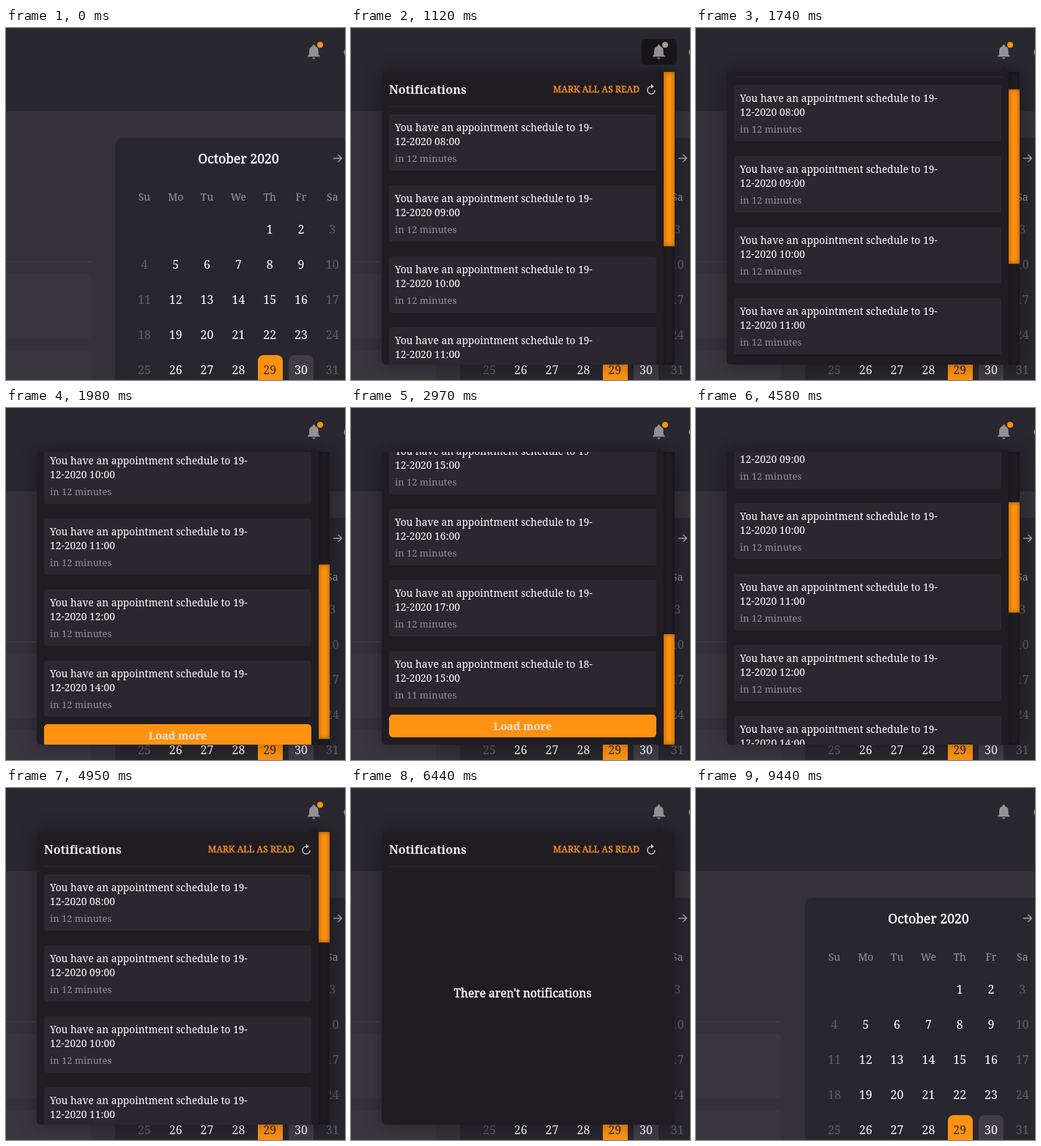
Write an HTML page with a canvas that moves like this. It is 463x481 px and loops after 9.56 s.

```html
<!DOCTYPE html>
<html lang="en">
<head>
<meta charset="utf-8">
<title>Notifications</title>
<style>
  html, body { margin: 0; width: 100%; height: 100%; overflow: hidden; background: #34313a; }
  canvas { display: block; }
</style>
</head>
<body>
<canvas id="stage" width="463" height="481"></canvas>
<script>
const ctx = document.getElementById('stage').getContext('2d');
const LOOP = 9560;
const ORANGE = '#ff9210', PANEL = '#1f1c22', CARD = '#2a272e';
const LIGHT = '#fff', MUTED = '#98969c', DIM = '#625f67';
const VIEW = { x: 42, y: 60, w: 400, h: 400 };
const PITCH = 97;
const BELL = new Path2D('M12 22a2 2 0 0 0 2-2h-4a2 2 0 0 0 2 2zM18 16v-5c0-3-1.6-5.6-4.5-6.3V4' +
  'a1.5 1.5 0 0 0-3 0v.7C7.6 5.4 6 8 6 11v5l-2 2v1h16v-1z');

const SLOTS = ['08', '09', '10', '11', '12', '14', '15', '16', '17']
  .map(hour => ({ day: 19, hour, wait: 12 }))
  .concat({ day: 18, hour: '15', wait: 11 });

// [start time, scroll offset]; each value holds until the next.
const SCROLL = [
  [0, 0], [1740, 40], [1860, 160], [1980, 258], [2100, 271], [2970, 659],
  [4220, 657], [4340, 560], [4460, 340], [4580, 182], [4830, 60], [4950, 0],
];
const scrollAt = t => SCROLL.findLast(([start]) => start <= t)[1];
const during = (t, from, to) => t >= from && t < to;

function box(x, y, w, h, radius, color) {
  ctx.fillStyle = color;
  ctx.beginPath();
  ctx.roundRect(x, y, w, h, radius);
  ctx.fill();
}

// A rectangle shaded along the inside of its edges.
function insetBox(x, y, w, h, color) {
  box(x, y, w, h, 0, color);
  ctx.save();
  ctx.clip();
  ctx.shadowColor = 'rgba(0, 0, 0, 0.5)';
  ctx.shadowBlur = 6;
  ctx.strokeStyle = '#000';
  ctx.lineWidth = 4;
  ctx.strokeRect(x - 2, y - 2, w + 4, h + 4);
  ctx.restore();
}

function text(str, x, y, size, color, { align = 'left', bold = false, medium = false } = {}) {
  ctx.font = `${bold ? 'bold ' : ''}${size}px "Noto Serif", serif`;
  ctx.letterSpacing = '0.05px';
  ctx.textAlign = align;
  ctx.fillStyle = ctx.strokeStyle = color;
  ctx.fillText(str, x, y);
  if (medium) {
    ctx.lineWidth = 0.4;
    ctx.strokeText(str, x, y);
  }
}

function stroke(path, color, width) {
  ctx.strokeStyle = color;
  ctx.lineWidth = width;
  ctx.stroke(new Path2D(path));
}

function fill(path, color) {
  ctx.fillStyle = color;
  ctx.fill(new Path2D(path));
}

function drawCalendar() {
  const center = { align: 'center' };
  box(149, 150, 330, 350, 10, '#29272e');
  text('October 2020', 317.5, 185, 17.5, LIGHT, { align: 'center', medium: true });
  stroke('M447 178H458.5M453.5 173L458.5 178L453.5 183', '#a3a1a7', 1.4);

  const columnX = i => 189 + 42.8 * i;
  ['Su', 'Mo', 'Tu', 'We', 'Th', 'Fr', 'Sa'].forEach((name, i) =>
    text(name, columnX(i), 236, 14, MUTED, center));

  box(344, 447, 34, 40, 8, ORANGE);
  box(386, 447, 34, 40, 8, '#403d46');
  for (let day = 1; day <= 31; day++) {
    const cell = day + 3, column = cell % 7;
    const weekend = column === 0 || column === 6;
    const color = day === 29 ? '#29272e' : weekend ? DIM : LIGHT;
    text(day, columnX(column), 281 + 48 * Math.floor(cell / 7), 16, color, center);
  }
}

function drawPage() {
  box(0, 0, 463, 481, 0, '#34313a');
  box(0, 0, 463, 114, 0, '#29272f');
  box(0, 319, 116, 1, 0, '#45424b');
  box(-10, 336, 126, 88, 5, '#393640');
  box(-10, 440, 126, 88, 5, '#393640');
  drawCalendar();
  stroke('M464 28.5Q460.5 33 464 37.5', '#a3a1a7', 1.4);
}

function drawBell(t) {
  const pressed = during(t, 870, 1370);
  if (pressed) box(397, 15, 48, 35, 5, '#17151a');
  ctx.save();
  ctx.translate(407.8, 19.8);
  ctx.scale(1.05, 1.03);
  ctx.fillStyle = '#939196';
  ctx.fill(BELL);
  ctx.restore();
  if (t < 6320) box(425, 19, 8, 8, 4, pressed ? '#ac9a85' : ORANGE);
}

function drawHeader() {
  text('Notifications', 52, 90, 16, '#f0eef2', { bold: true });
  text('MARK ALL AS READ', 276, 88, 12.1, '#f78f1a', { medium: true });
  stroke('M415.2 85A5.2 5.2 0 1 1 410 79.8', '#e4e2e6', 1.2);
  fill('M410 76.8L413.6 79.8L410 82.8Z', '#e4e2e6');
  box(52, 106.5, 367, 1, 0, '#2d2a31');
}

function drawItem({ day, hour, wait }, y) {
  box(52, y, 365, 77, 4, CARD);
  text(`You have an appointment schedule to ${day}-`, 60, y + 23, 13.7, LIGHT);
  text(`12-2020 ${hour}:00`, 60, y + 42, 13.7, LIGHT);
  text(`in ${wait} minutes`, 60, y + 65, 12.9, '#929096');
}

function drawList(t) {
  const items = SLOTS.slice(0, t < 2970 ? 6 : 10);
  const scroll = scrollAt(t);
  const contentHeight = 89 + PITCH * items.length;

  ctx.save();
  ctx.translate(0, -scroll);
  drawHeader();
  items.forEach((item, i) => drawItem(item, 118 + PITCH * i));
  const buttonY = 108 + PITCH * items.length;
  box(52, buttonY, 365, 31, 5, ORANGE);
  text('Load more', 234.5, buttonY + 21, 14.5, '#ebe6e6', { align: 'center', bold: true });
  ctx.restore();

  const ratio = VIEW.h / contentHeight;
  insetBox(427, VIEW.y, 15, VIEW.h, PANEL);
  insetBox(427, VIEW.y + scroll * ratio, 15, VIEW.h * ratio, ORANGE);
}

function drawPanel(t) {
  const { x, y, w, h } = VIEW;
  ctx.save();
  ctx.shadowColor = 'rgba(0, 0, 0, 0.35)';
  ctx.shadowBlur = 25;
  box(x, y, w, h, 5, PANEL);
  ctx.restore();
  fill('M414 60L421 54L428 60Z', PANEL);

  ctx.save();
  ctx.beginPath();
  ctx.rect(x, y, w, h);
  ctx.clip();
  if (t < 6320) {
    drawList(t);
  } else {
    drawHeader();
    ctx.globalAlpha = t < 6440 ? 0.5 : 1;
    text("There aren't notifications", 234.5, 286, 15.5, LIGHT, { align: 'center', medium: true });
  }
  ctx.restore();
}

function frame(now) {
  const t = now % LOOP;
  drawPage();
  if (during(t, 1120, 9440)) drawPanel(t);
  drawBell(t);
  requestAnimationFrame(frame);
}
frame(0);
</script>
</body>
</html>
```
